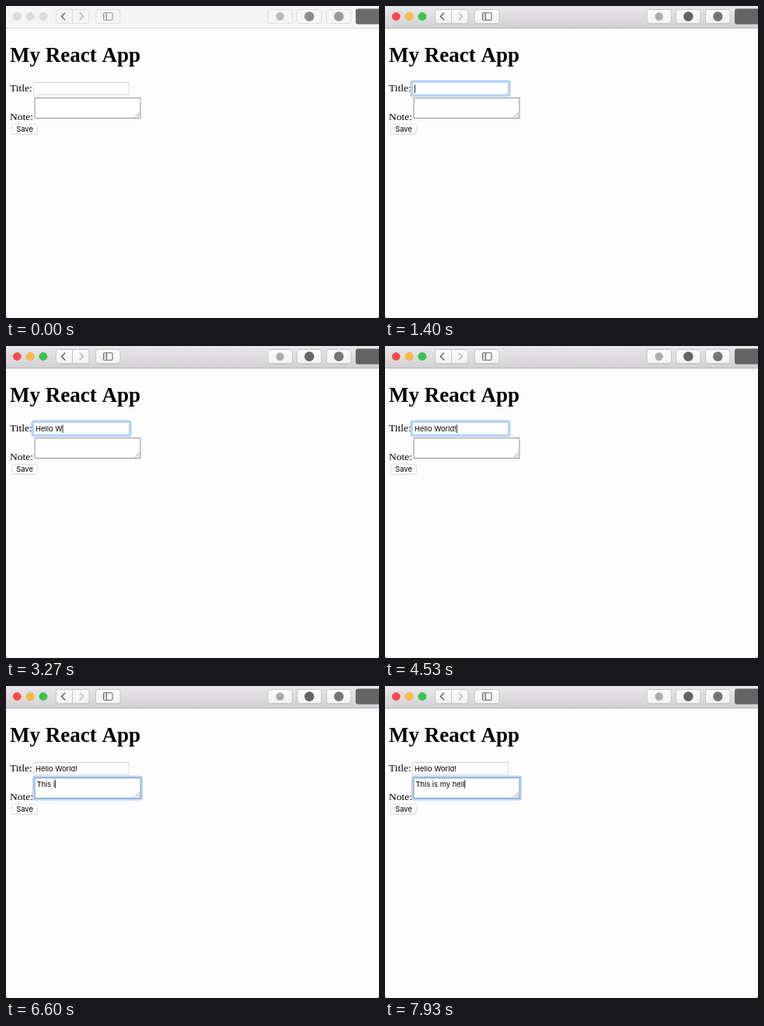
An HTML page with a canvas for the animation above (8000 ms loop, 480x402 px).

```html
<!DOCTYPE html>
<html lang="en">
<head>
<meta charset="utf-8">
<title>Form demo</title>
<style>
  html, body { margin: 0; width: 100%; height: 100%; overflow: hidden; background: #fefdfe; }
  canvas { display: block; width: 480px; height: 402px; }
</style>
</head>
<body>
<canvas id="stage"></canvas>
<script>
const LOOP = 8000, W = 480, H = 402;
const SERIF = '"Liberation Serif", serif';
const SANS = '9.4px Inter, sans-serif';
const canvas = document.getElementById('stage');
const ctx = canvas.getContext('2d');
const dpr = window.devicePixelRatio || 1;
canvas.width = W * dpr;
canvas.height = H * dpr;

// One key press time per character
const title = {
  text: 'Hello World!', x: 38, y: 110.1, from: 1330, to: 5270,
  keys: [2130, 2330, 2470, 2600, 2800, 3000, 3270, 3470, 3670, 3930, 4130, 4530]
};
const note = {
  text: 'This is my hell', x: 39.4, y: 129.6, from: 5330, to: LOOP,
  keys: [6000, 6200, 6330, 6400, 6530, 6600, 6730, 6800, 7070, 7270, 7400, 7530, 7670, 7870, 7930]
};

function box(x, y, w, h, r, fill, stroke, width = 1) {
  ctx.beginPath();
  ctx.roundRect(x, y, w, h, r);
  if (fill) { ctx.fillStyle = fill; ctx.fill(); }
  if (stroke) { ctx.strokeStyle = stroke; ctx.lineWidth = width; ctx.stroke(); }
}

function dot(x, y, r, fill, stroke) {
  ctx.beginPath();
  ctx.arc(x, y, r, 0, Math.PI * 2);
  ctx.fillStyle = fill;
  ctx.fill();
  if (stroke) { ctx.strokeStyle = stroke; ctx.lineWidth = 0.6; ctx.stroke(); }
}

function line(points, color, width) {
  ctx.beginPath();
  points.forEach(([x, y]) => ctx.lineTo(x, y));
  ctx.strokeStyle = color;
  ctx.lineWidth = width;
  ctx.stroke();
}

function label(text, x, y, font, color = '#000') {
  ctx.font = font;
  ctx.fillStyle = color;
  ctx.fillText(text, x, y);
}

function gradient(y0, y1, top, bottom) {
  const g = ctx.createLinearGradient(0, y0, 0, y1);
  g.addColorStop(0, top);
  g.addColorStop(1, bottom);
  return g;
}

function toolbar(active) {
  ctx.fillStyle = active ? gradient(0, 28, '#e9e7e9', '#d3d1d3') : '#f6f5f6';
  ctx.fillRect(0, 0, W, 28);
  ctx.fillStyle = active ? '#b4b2b4' : '#d8d7d8';
  ctx.fillRect(0, 28, W, 1);

  const lights = active
    ? [['#fc4b49', '#e0403d'], ['#fdbc40', '#dfa02f'], ['#35c84b', '#27a93a']]
    : Array(3).fill(['#dddcdd', '#cfcecf']);
  lights.forEach(([fill, edge], i) => dot(14.3 + 16.8 * i, 13.5, 5, fill, edge));

  const face = active ? gradient(4, 23, '#fdfdfd', '#f2f1f2') : '#f7f6f7';
  const edge = active ? '#c6c4c6' : '#dfdedf';
  const button = (x, w) => {
    if (active) box(x, 5, w, 18.5, 3, '#bfbdbf');
    box(x, 4.5, w, 18, 3, face, edge);
  };
  button(64.5, 42.5);
  [115.5, 337, 374.5, 412.5].forEach(x => button(x, 31.5));
  line([[85.5, 5], [85.5, 22]], edge, 1);
  line([[76.2, 8.8], [71.4, 13.5], [76.2, 18.2]], active ? '#555' : '#666', 1.3);
  line([[94.8, 8.8], [99.6, 13.5], [94.8, 18.2]], active ? '#b3b3b3' : '#aaa', 1.3);

  const ink = active ? '#5e5e5e' : '#8c8c8c';
  box(125.5, 8.8, 11.5, 9.4, 0.8, null, ink, 1);
  line([[129.5, 8.8], [129.5, 18.2]], ink, 1);
  [11, 13, 15].forEach(y => line([[126.6, y], [128.4, y]], ink, 0.7));

  dot(352.6, 13.5, 5.2, active ? '#adacad' : '#b9b8b9');
  dot(390.3, 13.5, 6.2, active ? '#656465' : '#8b8a8b');
  dot(428.3, 13.5, 6.2, active ? '#777677' : '#9b9a9b');
  box(450, 3.5, 40, 20, 3, active ? '#656465' : '#6c6b6c');
}

function ring(x, y, w, h, alpha) {
  if (alpha <= 0) return;
  ctx.globalAlpha = alpha;
  box(x - 1.2, y - 1.2, w + 2.4, h + 2.4, 2, null, '#b3d3f8', 2.8);
  ctx.globalAlpha = 1;
}

// Ring strength: fades in over two short steps, then drops
function focus(field, t) {
  if (t < field.from || t >= field.to) return 0;
  return t < field.from + 70 ? 0.55 : 1;
}

function typed(field, t) {
  const count = field.keys.filter(k => k <= t).length;
  const text = field.text.slice(0, count);
  label(text, field.x, field.y, SANS);
  const last = count ? field.keys[count - 1] : field.from;
  if (focus(field, t) && (t - last) % 1000 < 500) {
    ctx.fillStyle = '#111';
    ctx.fillRect(field.x + ctx.measureText(text).width + 0.1, field.y - 8.6, 0.9, 10.6);
  }
}

function page(t) {
  label('My React App', 5, 72, 'bold 27px ' + SERIF);
  label('Title:', 5, 110, '13.5px ' + SERIF);
  label('Note:', 5, 146.6, '13.5px ' + SERIF);

  const titleFocus = focus(title, t);
  box(35.5, 98.5, 123, 15.5, 0, '#fff', titleFocus ? '#bcd3ee' : '#dcdbdc');
  if (!titleFocus) line([[35, 98.5], [159, 98.5]], '#cfcecf', 1);
  ring(35, 98, 124, 16.5, titleFocus);
  typed(title, t);

  const noteFocus = focus(note, t);
  ring(36.5, 118, 137, 27, noteFocus);
  box(37, 118.5, 136, 26, 0, '#fff', noteFocus ? '#8297b0' : '#929192');
  line([[166, 143.2], [172, 137.2]], '#777', 0.8);
  line([[169.4, 143.2], [172, 140.6]], '#777', 0.8);
  typed(note, t);

  box(7.5, 152.8, 33, 13, 3, '#cfcecf');
  box(7.5, 152.3, 33, 12.7, 3, '#fff', '#dddcdd', 0.8);
  label('Save', 13.2, 162.4, SANS);
}

function corner(x, dir) {
  ctx.beginPath();
  ctx.moveTo(x, H - 3);
  ctx.quadraticCurveTo(x, H, x + 3 * dir, H);
  ctx.lineTo(x, H);
  ctx.fillStyle = '#8a898a';
  ctx.fill();
}

function draw(t) {
  ctx.setTransform(dpr, 0, 0, dpr, 0, 0);
  ctx.fillStyle = '#fefdfe';
  ctx.fillRect(0, 0, W, H);
  toolbar(t >= 800);
  page(t);
  corner(0, 1);
  corner(W, -1);
}

const start = performance.now();
function tick() {
  draw((performance.now() - start) % LOOP);
  requestAnimationFrame(tick);
}
tick();
</script>
</body>
</html>
```
